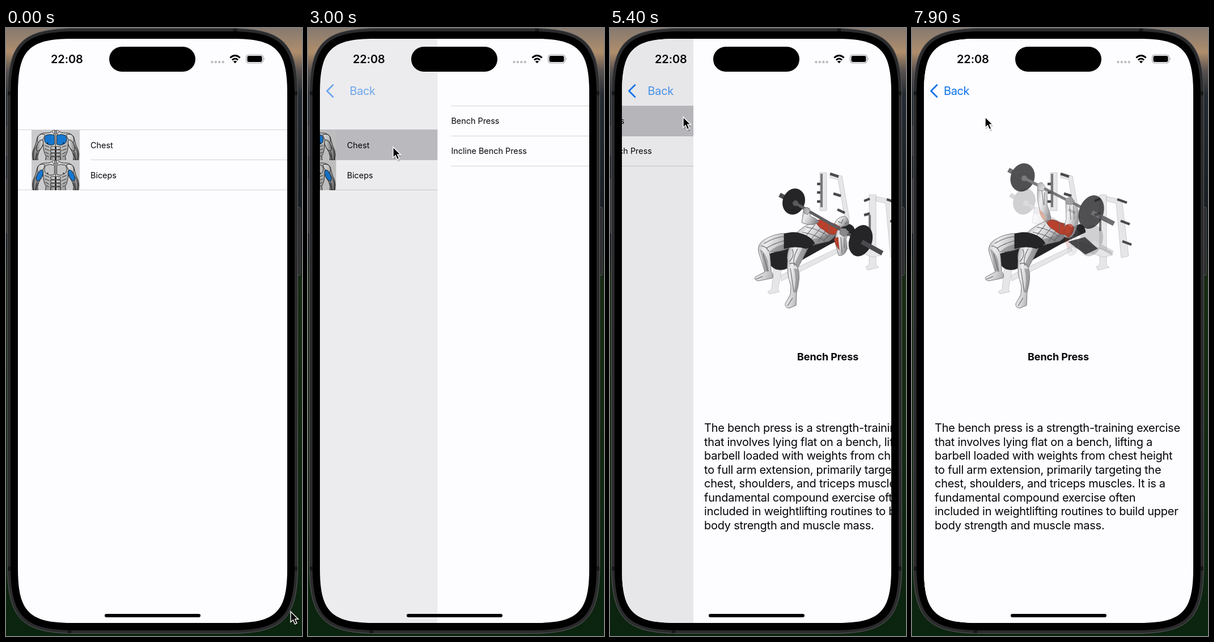
An HTML page that plays this animation: 522x1072 px, repeating every 8000 ms.

```html
<!DOCTYPE html>
<html lang="en">
<head>
<meta charset="utf-8">
<title>Workout list</title>
<style>
html, body { margin: 0; width: 100%; height: 100%; overflow: hidden; background: #10200f; }
svg { display: block; width: 522px; height: 1072px; }
text { font-family: Inter, Roboto, sans-serif; fill: #050507; }
.row { font-size: 14.4px; }
.body { font-size: 20px; letter-spacing: -.27px; }
.title { font-size: 18px; font-weight: 700; letter-spacing: -.12px; text-anchor: middle; }
.clock { font-size: 20px; font-weight: 600; letter-spacing: -.1px; }
.back { font-size: 20px; letter-spacing: -.4px; fill: #0b73ea; }
.line { stroke: #d3d2d6; fill: none; }
.page { fill: #fdfcff; }
.press { fill: #c7c6cb; }
.steel { fill: #e6e6e8; stroke: #c3c3c7; stroke-width: .8; }
.peg { stroke: #4a4a4d; stroke-width: 4.5; fill: none; }
.skin { fill: url(#skin); stroke: #6c6c70; stroke-width: .9; }
.crease { fill: none; stroke: #636367; stroke-width: 1.1; }
.shade { fill: #6f6f73; opacity: .5; }
.red { fill: #b9402c; stroke: #7d2b20; stroke-width: .7; }
.black { fill: #252528; stroke: #111; stroke-width: .7; }
.bar { stroke: #5b5b5f; stroke-width: 5; }
.sleeve { stroke: #4b4b4f; stroke-width: 8; }
</style>
</head>
<body>
<svg viewBox="0 0 522 1072">
  <defs>
    <linearGradient id="scene" x2="0" y2="1">
      <stop stop-color="#85796f"/><stop offset=".04" stop-color="#b08e6c"/>
      <stop offset=".07" stop-color="#5a5350"/><stop offset=".11" stop-color="#232a31"/>
      <stop offset=".36" stop-color="#151b1f"/><stop offset=".42" stop-color="#182b13"/>
      <stop offset="1" stop-color="#0b240f"/>
    </linearGradient>
    <linearGradient id="skin" x2="1" y2=".5">
      <stop stop-color="#98989b"/><stop offset=".35" stop-color="#ececed"/>
      <stop offset=".6" stop-color="#cfcfd1"/><stop offset="1" stop-color="#88888c"/>
    </linearGradient>
    <linearGradient id="muscle" x2="1" y2="1">
      <stop stop-color="#ececec"/><stop offset=".5" stop-color="#b5b5b5"/><stop offset="1" stop-color="#6a6a6a"/>
    </linearGradient>
    <clipPath id="screen"><path id="display"/></clipPath>
    <clipPath id="thumb"><rect width="85" height="53"/></clipPath>

    <g id="half" stroke="#2c2c2e" fill="url(#muscle)">
      <path d="M0 0H4Q6 4 14 5Q27 4 32 12Q34 20 36 27Q41 36 41 43L40 54H31Q33 46 30 40L26 32Q23 28 22 24Q22 38 17 46L18 54H0Z"/>
      <path d="M19 8Q30 5 32 14Q33 21 30 23Q21 18 19 8ZM33 28Q41 36 39 53H34Q36 40 30 35Z"/>
      <path d="M1 29H8Q10 31 8 34H1ZM1 35H9Q10 38 8 40H1ZM1 41H9Q10 44 8 46H1ZM1 47H9V54H1Z"/>
      <path fill="none" d="M2 0V7M6 3L2 8M11 30L19 27M11 36L19 33M12 42L18 39M12 47L16 45M31 40L36 53"/>
    </g>
    <path id="pec" d="M2 9Q10 6 17 9Q22 15 18 22Q11 29 2 25Z" stroke="#2c2c2e"/>
    <ellipse id="bicep" cx="28" cy="27" rx="4.6" ry="10.5" transform="rotate(-25 28 27)" stroke="#2c2c2e"/>
    <g id="chestHalf"><use href="#half"/><use href="#bicep" fill="url(#muscle)"/><use href="#pec" fill="#1677d0"/><circle cx="14" cy="23" r="1.1"/></g>
    <g id="armHalf"><use href="#half"/><use href="#pec" fill="#c4c4c5"/><use href="#bicep" fill="#1677d0"/><circle cx="14" cy="23" r="1.1"/></g>

    <path id="chevron" d="M44 100.500L33.500 111L44 121.500" fill="none" stroke="#0b73ea" stroke-width="2.800" stroke-linecap="round" stroke-linejoin="round"/>
  </defs>

  <rect width="522" height="1072" fill="url(#scene)"/>
  <rect x="512" y="316" width="7" height="120" rx="2" fill="#29292b" stroke="#555"/>
  <path d="M1.500 172V226M1.500 266V362" stroke="#3c3c3e" stroke-width="2"/>
  <path id="shell" fill="#2b2b2d" stroke="#5a5a5d"/>
  <path d="M3 115H8M509 115H514M3 953H8M509 953H514M404 1V6M112 1062V1067" stroke="#171718" stroke-width="7"/>
  <path id="bezel"/>

  <g clip-path="url(#screen)">
    <g id="page0">
      <rect class="page" x="21" y="19" width="475" height="1030"/>
      <path class="line" d="M21 179.500H496M149 232.500H496M21 285.500H496"/>
      <rect id="press0" class="press" x="21" y="179" width="475" height="54"/>
      <g transform="translate(45 180)" clip-path="url(#thumb)">
        <rect width="85" height="53" fill="#cacacc"/>
        <use href="#chestHalf" x="42.500"/><use href="#chestHalf" transform="translate(42.500) scale(-1 1)"/>
      </g>
      <g transform="translate(45 233)" clip-path="url(#thumb)">
        <rect width="85" height="53" fill="#cacacc"/>
        <use href="#armHalf" x="42.500"/><use href="#armHalf" transform="translate(42.500) scale(-1 1)"/>
      </g>
      <text class="row" x="149" y="211.500">Chest</text>
      <text class="row" x="149" y="264.500">Biceps</text>
      <rect id="dim0" x="21" y="19" width="475" height="1030"/>
    </g>

    <g id="page1">
      <rect class="page" x="21" y="19" width="475" height="1030"/>
      <path class="line" d="M45 137.500H496M45 190.500H496M45 243.500H496"/>
      <rect id="press1" class="press" x="21" y="137" width="475" height="54"/>
      <text class="row" x="45" y="169">Bench Press</text>
      <text class="row" x="45" y="222">Incline Bench Press</text>
      <rect id="dim1" x="21" y="19" width="475" height="1030"/>
    </g>

    <g id="page2">
      <rect class="page" x="21" y="19" width="475" height="1030"/>
      <g id="rack">
        <path class="steel" d="M262 257L283 261L296 336L288 334L276 267L262 264ZM244 255H256V322H244ZM343 297L370 303L382 402L369 405L360 309L343 305ZM331 294H343V418L348 422L328 427L325 421L331 417Z"/>
        <path class="peg" d="M262 257L277 262M268 292L281 296M275 320L288 326M362 302L379 308M368 340L384 346M371 376L387 382M322 305L332 301M322 330L332 327M239 275H246M239 290H246M239 306H246"/>
        <path d="M247 257V316M332 330V358" stroke="#777" stroke-width="4"/>
        <path class="steel" d="M282 374L350 394L354 400L338 404L278 384ZM175 436L280 386L282 393L176 446ZM163 422L176 427L170 462L173 465L155 469L152 465L159 461Z"/>
      </g>
      <path class="black" d="M150 405Q151 398 163 396L205 382L296 346Q305 348 306 360L262 381L185 424Q178 428 166 425Q155 420 150 405Z"/>
      <path class="skin" d="M188 362Q165 361 145 374Q133 382 136 395Q142 414 147 430L130 439Q127 444 135 446L160 441Q164 437 158 429Q157 407 155 395Q175 395 190 388Z"/>
      <path class="skin" d="M192 384Q185 396 187 411Q185 432 193 455L192 470L183 486Q182 493 190 494L202 489L203 466Q211 437 205 423Q214 407 224 386Z"/>
      <path class="shade" d="M188 380Q168 382 154 395Q174 396 189 388ZM138 390Q147 394 152 410L154 430L147 429ZM214 386Q207 400 199 416L205 423Q213 408 224 387ZM205 425Q210 438 203 466L198 467Q204 444 198 424Z"/>
      <path class="crease" d="M187 367Q164 368 146 380M185 374Q164 379 150 388M140 384Q150 385 154 394M144 398L152 428M195 390Q201 401 190 412M205 389Q195 406 199 419M190 416Q198 412 204 420M192 424L198 465M131 443L143 438M187 490L196 476"/>
      <path class="skin" d="M203 361Q221 344 242 339L276 352Q274 368 260 376L230 383Z"/>
      <path class="shade" d="M227 373Q250 369 273 357Q271 370 260 376L231 383Z"/>
      <path class="crease" d="M213 360Q237 364 253 376M220 351Q240 354 257 366M219 367L235 347M229 372L246 352M241 376L254 358M250 375L263 363"/>
      <path class="black" d="M181 363Q194 359 205 361Q228 366 235 380L220 389Q201 383 181 389Z"/>
      <path class="red" d="M236 340Q249 335 261 343Q275 345 282 353Q277 364 267 364Q257 363 251 356Q241 352 236 340Z"/>
      <path class="crease" d="M261 344Q257 352 262 361"/>

      <g id="low">
        <path class="skin" d="M270 345Q274 333 288 332Q296 336 295 346Q287 352 277 349Z"/>
        <path class="crease" d="M276 341L282 344L285 337M288 346L292 342"/>
        <path class="skin" d="M216 317L226 318L227 332Q237 335 243 341L236 346Q222 348 212 343Z"/>
        <path class="skin" d="M274 358Q283 348 295 359L290 372L292 389Q288 403 277 401L270 374Z"/>
        <path class="red" d="M269 371L276 369L278 391Q271 383 269 371Z"/>
        <path class="crease" d="M281 369L283 397M287 370L287 388"/>
        <path class="sleeve" d="M173 294L197 307M316 376L354 397"/>
        <path class="bar" d="M195 306L320 378"/>
        <ellipse class="black" cx="198" cy="306" rx="19" ry="23" transform="rotate(20 198 306)"/>
        <ellipse class="black" cx="316" cy="375" rx="19.500" ry="28" transform="rotate(20 316 375)"/>
        <path class="sleeve" d="M318 377L354 397"/>
        <circle cx="201" cy="309" r="5" fill="#59595c"/>
        <path class="bar" d="M201 309L222 321"/>
        <path class="skin" d="M215 318L222 316L227 323L222 329L216 326ZM280 353L290 354L294 362L287 368L279 363Z"/>
      </g>

      <g id="high">
        <path class="black" d="M276 377L305 369L327 389L306 399Z"/>
        <path class="skin" d="M222 280L232 278Q241 292 238 311Q244 325 245 337L238 343Q226 335 225 319Q219 301 222 280Z"/>
        <path d="M224 320Q234 326 237 340Q226 336 224 320Z" fill="#d6a087"/>
        <path class="skin" d="M271 306L283 304Q294 316 293 332Q294 347 286 363Q278 374 269 368Q267 350 272 336Z"/>
        <path class="red" d="M270 349Q279 342 285 350Q286 361 277 369Q268 367 268 359Z"/>
        <path class="crease" d="M229 286L232 312M234 290L233 312M278 313L280 338M285 314L286 338"/>
        <path class="sleeve" d="M170 250L194 263M316 325L356 345"/>
        <path class="bar" d="M194 263L320 327"/>
        <ellipse class="black" cx="195" cy="263.500" rx="20.500" ry="25" transform="rotate(20 195 263.500)"/>
        <ellipse class="black" cx="316" cy="324.500" rx="21" ry="30" transform="rotate(20 316 324.500)"/>
        <path class="sleeve" d="M317 325L356 345"/>
        <circle cx="198" cy="265" r="5" fill="#59595c"/>
        <path class="bar" d="M198 265L230 281"/>
        <path class="skin" d="M221 275L229 272L235 280L231 287L222 286ZM271 301L280 297L287 306L281 312L272 310Z"/>
      </g>

      <text class="title" x="258" y="586">Bench Press</text>
      <g id="about"></g>
    </g>

    <use id="arrow" href="#chevron"/>
    <text id="back1" class="back" y="118">Back</text>
    <text id="back2" class="back" y="118">Back</text>

    <text class="clock" x="79" y="62">22:08</text>
    <rect x="182" y="33" width="152" height="44" rx="22"/>
    <path d="M363.500 60H383" stroke="#bdbcc1" stroke-width="4.400" stroke-linecap="round" stroke-dasharray="0 6.400"/>
    <path d="M395.300 52.500Q404 44.500 412.700 52.500M398.800 56.300Q404 51.800 409.200 56.300" fill="none" stroke="#000" stroke-width="2.900"/>
    <path d="M400.800 59Q404 56.300 407.200 59L404 62.300Z"/>
    <rect x="423.500" y="47" width="30" height="15" rx="5" fill="none" stroke="#a2a1a6" stroke-width="1.200"/>
    <rect x="425.500" y="49" width="26" height="11" rx="3.200"/>
    <path d="M455 52Q457 54.500 455 57Z" fill="#a2a1a6"/>
    <rect x="174" y="1033" width="169" height="6" rx="3"/>
  </g>

  <g id="cursor">
    <path d="M0 1V20L4.500 16L8 23.500L11.500 22L8.200 14.500H14Z" opacity=".18" transform="translate(1 2)"/>
    <path d="M0 0V18.500L4.300 14.600L7.600 22L10.900 20.500L7.700 13.300H13.500Z" stroke="#fff" stroke-width="1.400"/>
  </g>
</svg>
<script>
const $ = id => document.getElementById(id);
const LOOP = 8000, WIDTH = 475;
const pushStart = [2896, 5256];

// Rounded box whose corners bend in gradually, like the phone's.
function roundBox(id, x, y, w, h, r) {
  const a = 1.45 * r, c = 0.3 * r, R = x + w, B = y + h;
  $(id).setAttribute('d', `M${x} ${y + a}C${x} ${y + c} ${x + c} ${y} ${x + a} ${y}
    H${R - a}C${R - c} ${y} ${R} ${y + c} ${R} ${y + a}
    V${B - a}C${R} ${B - c} ${R - c} ${B} ${R - a} ${B}
    H${x + a}C${x + c} ${B} ${x} ${B - c} ${x} ${B - a}Z`);
}
roundBox('shell', 2.5, 0.5, 512, 1067, 84);
roundBox('bezel', 8, 6, 501, 1056, 79);
roundBox('display', 21, 19, 475, 1030, 66);

const about = [
  'The bench press is a strength-training exercise',
  'that involves lying flat on a bench, lifting a',
  'barbell loaded with weights from chest height',
  'to full arm extension, primarily targeting the',
  'chest, shoulders, and triceps muscles. It is a',
  'fundamental compound exercise often',
  'included in weightlifting routines to build upper',
  'body strength and muscle mass.'
];
$('about').innerHTML = about.map((line, i) =>
  `<text class="body" x="40" y="${712 + i * 24.55}">${line}</text>`).join('');

const clamp = v => Math.max(0, Math.min(1, v));
const ramp = (t, a, b) => clamp((t - a) / (b - a));
const ease = v => v * v * (3 - 2 * v);
const move = (el, x, y = 0) => el.setAttribute('transform', `translate(${x} ${y})`);
const fade = (el, opacity) => el.setAttribute('opacity', opacity);

// Critically damped spring: 0 before the push, settling at 1.
function push(t) {
  const s = Math.max(0, t) * 0.018;
  return 1 - (1 + s) * Math.exp(-s);
}

function draw(t) {
  const [p, q] = pushStart.map(start => push(t - start));
  const enter = [1, p, q], leave = [p, q, 0];
  enter.forEach((v, i) => move($('page' + i), WIDTH * (1 - v - 0.3 * leave[i])));
  [p, q].forEach((v, i) => {
    fade($('dim' + i), 0.12 * v);
    fade($('press' + i), t >= pushStart[i] - 80 ? 1 : 0);
  });

  fade($('arrow'), p);
  $('back1').setAttribute('x', 56 + 40 * (1 - p - q));
  fade($('back1'), p * clamp(1 - 2 * q));
  $('back2').setAttribute('x', 56 + 40 * (1 - q));
  fade($('back2'), q);

  const lift = ramp(t, 6550, 6800) - ramp(t, 7850, 8100);
  fade($('low'), 1 - lift);
  fade($('high'), lift);

  const a = ease(ramp(t, 600, 2300)), b = ease(ramp(t, 4200, 4650));
  move($('cursor'), 502 - 352 * a - 21 * b, 1029 - 819 * a - 53 * b);
}

function tick() {
  draw(performance.now() % LOOP);
  requestAnimationFrame(tick);
}
tick();
</script>
</body>
</html>
```
